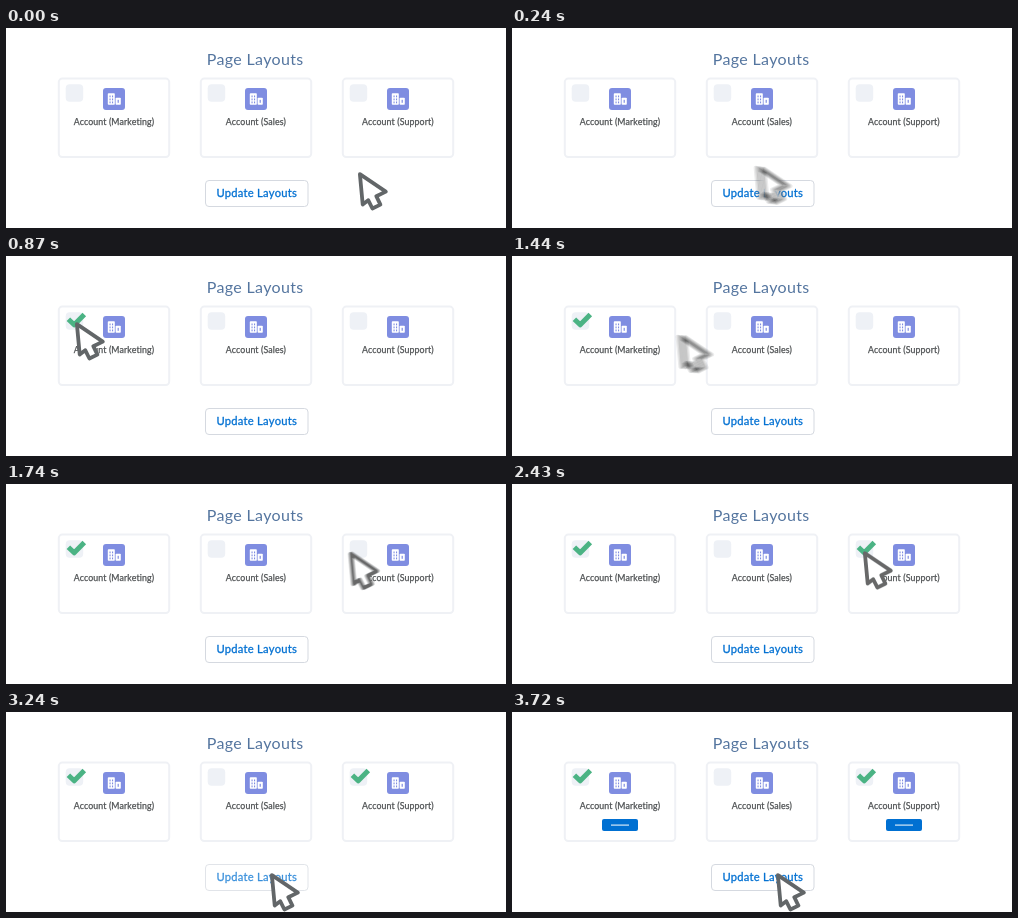
Write an HTML page with a canvas that moves like this. It is 500x200 px and loops after 4650 ms.

```html
<!DOCTYPE html>
<html lang="en">
<head>
<meta charset="utf-8">
<title>Page Layouts</title>
<style>
html, body { margin: 0; width: 100%; height: 100%; overflow: hidden; background: #fff; }
canvas { display: block; width: 500px; height: 200px; }
</style>
</head>
<body>
<canvas id="stage"></canvas>
<script>
const W = 500, H = 200, LOOP = 4650, STEP = 30;
const BLUE = '#0070d2', VIOLET = '#7f8de1';
const FONT = 'Lato, "Open Sans", sans-serif';
const ratio = window.devicePixelRatio || 1;

function setup(canvas) {
  canvas.width = W * ratio;
  canvas.height = H * ratio;
  const c = canvas.getContext('2d');
  c.scale(ratio, ratio);
  return c;
}
const ctx = setup(document.getElementById('stage'));
const single = document.createElement('canvas');
const one = setup(single);
const layer = document.createElement('canvas');
const blur = setup(layer);

const cards = [
  { x: 52, label: 'Account (Marketing)', checkAt: 600 },
  { x: 194, label: 'Account (Sales)', checkAt: Infinity },
  { x: 336, label: 'Account (Support)', checkAt: 1800 }
];

// Each path is a quadratic curve: start, control, end.
const moves = [
  { at: 0, dur: 600, path: [[352, 144], [143, 144], [69, 66]] },
  { at: 1200, dur: 600, path: [[69, 66], [210, 94], [351, 66]] },
  { at: 2400, dur: 600, path: [[351, 66], [351, 139], [264, 161]] }
];
const pills = [
  { at: 3215, dur: 420, path: [[250, 165], [180, 96], [108, 113]] },
  { at: 3300, dur: 420, path: [[250, 165], [330, 165], [392, 113]] }
];
const arrow = [[1.9, 2.2], [27.8, 19.6], [18.3, 24.2], [22.4, 32.6],
  [14.4, 36.5], [10.2, 28.2], [4.7, 32.4]];

const progress = (t, at, dur) => Math.min(1, Math.max(0, (t - at) / dur));
const ease = p => p * p * (3 - 2 * p);
const mix = (a, b, f) => [a[0] + (b[0] - a[0]) * f, a[1] + (b[1] - a[1]) * f];
const curve = ([a, b, c], u) => mix(mix(a, b, u), mix(b, c, u), u);

// Point at a share of the curve's length.
function along(path, share) {
  const n = 80, pts = [path[0]], len = [0];
  for (let i = 1; i <= n; i++) {
    pts.push(curve(path, i / n));
    len.push(len[i - 1] + Math.hypot(pts[i][0] - pts[i - 1][0], pts[i][1] - pts[i - 1][1]));
  }
  const goal = share * len[n];
  let i = 1;
  while (i < n && len[i] < goal) i++;
  return mix(pts[i - 1], pts[i], (goal - len[i - 1]) / (len[i] - len[i - 1]));
}

const place = (m, t) => along(m.path, ease(progress(t, m.at, m.dur)));

function box(x, y, w, h, r, fill, line, width) {
  ctx.beginPath();
  ctx.roundRect(x, y, w, h, r);
  if (fill) { ctx.fillStyle = fill; ctx.fill(); }
  if (line) { ctx.strokeStyle = line; ctx.lineWidth = width; ctx.stroke(); }
}

function text(str, x, y, size, color, spacing, weight) {
  ctx.font = size + 'px ' + FONT;
  ctx.letterSpacing = spacing + 'px';
  ctx.textAlign = 'center';
  ctx.fillStyle = ctx.strokeStyle = color;
  ctx.fillText(str, x, y);
  if (weight) { ctx.lineWidth = weight; ctx.strokeText(str, x, y); }
}

function icon(x, y) {
  box(x, y, 22, 22, 3, VIOLET);
  box(x + 4.8, y + 5.3, 7, 11.4, 0.8, '#fff');
  box(x + 12.6, y + 9.8, 5.2, 6.9, 0.8, '#fff');
  ctx.fillStyle = VIOLET;
  for (const row of [7.5, 10.5, 13.5]) {
    ctx.fillRect(x + 6.5, y + row, 1.1, 1.8);
    ctx.fillRect(x + 9, y + row, 1.1, 1.8);
  }
  ctx.fillRect(x + 14.6, y + 11.8, 1.2, 3);
}

function check(x, p) {
  if (p <= 0) return;
  const a = [x + 10.4, 63.2], b = [x + 16.2, 68.8], c = [x + 26.3, 58.4];
  const first = Math.min(1, p * 3), second = Math.max(0, (p * 3 - 1) / 2);
  ctx.beginPath();
  ctx.moveTo(...a);
  ctx.lineTo(...mix(a, b, first));
  if (second > 0) ctx.lineTo(...mix(b, c, second));
  ctx.strokeStyle = '#4bb384';
  ctx.lineWidth = 5;
  ctx.lineJoin = 'round';
  ctx.stroke();
}

function card(c, t) {
  box(c.x + 0.8, 50.6, 110.4, 78.4, 3.5, '#fff', '#eff1f5', 2);
  box(c.x + 7.7, 56.2, 17.5, 17.5, 4, '#eef1f6');
  icon(c.x + 45, 60);
  text(c.label, c.x + 55.9, 97, 8.8, '#4d5052', 0.12, 0.25);
  check(c.x, ease(progress(t, c.checkAt, 270)));
}

function pill(m, t) {
  if (t <= m.at) return;
  const [x, y] = place(m, t);
  box(x - 18, y - 6, 36, 12, 2, BLUE);
  ctx.fillStyle = '#d5e8f8';
  ctx.fillRect(x - 9, y - 0.5, 18, 1.2);
}

function button(t) {
  box(199.5, 152.5, 102.5, 26, 3.5, '#fff');
  ctx.globalAlpha = 1 - 0.3 * Math.sin(Math.PI * progress(t, 3000, 480));
  box(199.5, 152.5, 102.5, 26, 3.5, null, '#d5d9e0', 1);
  text('Update Layouts', 250.8, 169.3, 11.2, BLUE, 0.25, 0.3);
  ctx.globalAlpha = 1;
}

function drawArrow(c, x, y) {
  c.beginPath();
  arrow.forEach(([dx, dy]) => c.lineTo(x + dx, y + dy));
  c.closePath();
  c.fillStyle = '#fff';
  c.fill();
  c.strokeStyle = '#626668';
  c.lineWidth = 3.8;
  c.lineJoin = 'round';
  c.stroke();
}

function cursor(t) {
  const move = moves.filter(m => t >= m.at).pop();
  if (t <= move.at || t >= move.at + move.dur) {
    drawArrow(ctx, ...place(move, t));
    return;
  }
  // Average several opaque arrows to get motion blur.
  const n = 8, shutter = 15;
  blur.clearRect(0, 0, W, H);
  blur.globalCompositeOperation = 'lighter';
  blur.globalAlpha = 1 / n;
  for (let i = 0; i < n; i++) {
    one.clearRect(0, 0, W, H);
    drawArrow(one, ...place(move, t + shutter * ((i + 0.5) / n - 0.5)));
    blur.drawImage(single, 0, 0, W, H);
  }
  ctx.drawImage(layer, 0, 0, W, H);
}

function draw(now) {
  const t = Math.floor((now % LOOP) / STEP) * STEP;
  ctx.fillStyle = '#fff';
  ctx.fillRect(0, 0, W, H);
  text('Page Layouts', 249.2, 36.8, 16, '#54759f', 0.35);
  cards.forEach(c => card(c, t));
  pills.forEach(m => pill(m, t));
  button(t);
  cursor(t);
}

const start = performance.now();
function tick() {
  draw(performance.now() - start);
  requestAnimationFrame(tick);
}
tick();
</script>
</body>
</html>
```
